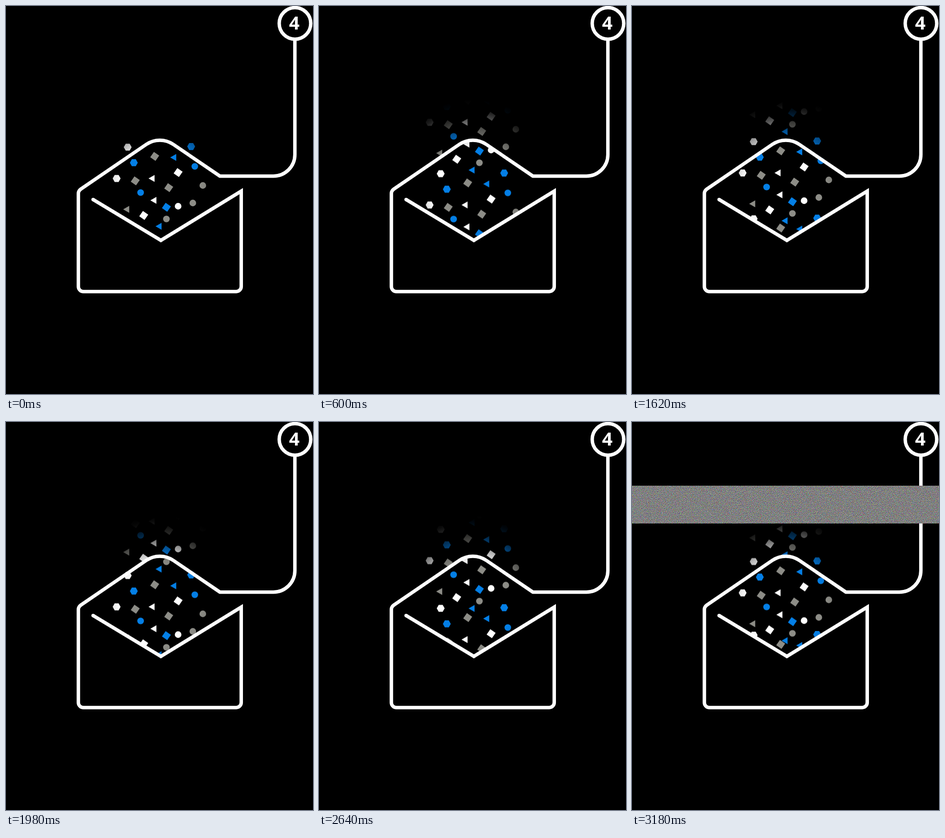
Write an HTML page without scripts that moves like this. It is 666x841 px and loops after 3.24 s.

```html
<!DOCTYPE html>
<html lang="en">
<head>
<meta charset="utf-8">
<title>Confetti envelope</title>
<style>
  html, body { margin: 0; width: 100%; height: 100%; overflow: hidden; background: #000; }
  svg { display: block; width: 100vw; height: 100vh; }
  .line { fill: none; stroke: #fff; stroke-width: 7.5; }
  .w { fill: #fff; }
  .b { fill: #047fe6; }
  .g { fill: #8d8d87; }
  .num { font: 800 40px "Noto Sans", "Open Sans", sans-serif; fill: #fff; text-anchor: middle; }

  /* the picture advances every 60 ms: 54 steps per loop */
  .fall { animation: fall 3240ms steps(54) -1ms infinite; }
  .one { --from: 0px; --to: 310.4px; }
  .two {
    --from: -186.5px; --to: 162.5px;
    animation: fall 3240ms steps(54) -1ms infinite, enter 3240ms step-end -1ms infinite;
  }
  .three { --from: -414.8px; --to: 4.2px; }
  .static { animation: flash 3240ms step-end -1ms infinite; }

  @keyframes fall {
    from { transform: translateY(var(--from)); }
    to { transform: translateY(var(--to)); }
  }
  @keyframes enter {
    0% { visibility: hidden; }
    1.85%, 100% { visibility: visible; }
  }
  @keyframes flash {
    0% { visibility: hidden; }
    98.14%, 100% { visibility: visible; }
  }
</style>
</head>
<body>
<svg viewBox="0 0 666 841" xmlns="http://www.w3.org/2000/svg">
  <defs>
    <path id="hex" d="M-8.6 0L-4.3 -7.6H4.3L8.6 0L4.3 7.6H-4.3Z"/>
    <rect id="sq" x="-7" y="-7" width="14" height="14" transform="rotate(35)"/>
    <path id="tri" d="M-6.8 0L6.3 -7.5V7.5Z"/>
    <circle id="dot" r="7.2"/>

    <g id="confetti">
      <use href="#hex" class="w" x="264" y="306"/>
      <use href="#hex" class="b" x="401.7" y="304.6"/>
      <use href="#hex" class="b" x="277.3" y="339.7"/>
      <use href="#hex" class="w" x="240" y="373.8"/>
      <use href="#sq" class="g" x="322.6" y="326"/>
      <use href="#sq" class="g" x="280.4" y="379"/>
      <use href="#sq" class="w" x="373.4" y="361"/>
      <use href="#sq" class="g" x="353" y="393.8"/>
      <use href="#sq" class="b" x="348" y="436.3"/>
      <use href="#sq" class="w" x="298.8" y="454"/>
      <use href="#tri" class="b" x="363" y="328.3"/>
      <use href="#tri" class="w" x="316" y="373.7"/>
      <use href="#tri" class="w" x="320" y="421.3"/>
      <use href="#tri" class="g" x="261" y="440.8"/>
      <use href="#tri" class="b" x="331.2" y="477.5"/>
      <use href="#dot" class="b" x="409.6" y="347.6"/>
      <use href="#dot" class="b" x="292" y="404.4"/>
      <use href="#dot" class="w" x="373.4" y="434"/>
      <use href="#dot" class="g" x="427" y="389"/>
      <use href="#dot" class="g" x="405.3" y="427"/>
      <use href="#dot" class="g" x="348" y="461.6"/>
    </g>

    <radialGradient id="glow" gradientUnits="userSpaceOnUse" cx="334" cy="399" r="196">
      <stop offset=".44" stop-color="#fff"/>
      <stop offset=".51" stop-color="#fff" stop-opacity=".93"/>
      <stop offset=".6" stop-color="#fff" stop-opacity=".76"/>
      <stop offset=".7" stop-color="#fff" stop-opacity=".53"/>
      <stop offset=".79" stop-color="#fff" stop-opacity=".31"/>
      <stop offset=".88" stop-color="#fff" stop-opacity=".12"/>
      <stop offset=".94" stop-color="#fff" stop-opacity=".04"/>
      <stop offset="1" stop-color="#fff" stop-opacity="0"/>
    </radialGradient>
    <mask id="fade" maskUnits="userSpaceOnUse" x="0" y="0" width="666" height="841">
      <rect width="666" height="841" fill="url(#glow)"/>
    </mask>
    <clipPath id="mouth">
      <path d="M157 150V400L336 508L510 401V150Z"/>
    </clipPath>
    <filter id="noise" x="0" y="0" width="1" height="1" color-interpolation-filters="sRGB">
      <feTurbulence type="fractalNoise" baseFrequency=".87" numOctaves="2" seed="4"/>
      <feColorMatrix values="1.1 0 0 0 -.05  0 1.1 0 0 -.05  0 0 1.1 0 -.05  0 0 0 0 1"/>
    </filter>
  </defs>

  <rect width="666" height="841"/>

  <g clip-path="url(#mouth)">
    <g mask="url(#fade)">
      <g class="fall one"><use href="#confetti"/></g>
      <g class="fall two"><use href="#confetti"/></g>
      <g class="fall three">
        <use href="#confetti"/>
        <use href="#confetti" y="-186.3"/>
      </g>
    </g>
  </g>

  <path class="line" d="M626.700 72V322A46.700 46.700 0 0 1 580 368.700H464L363 300A52 52 0 0 0 304.300 300L162.300 396.900Q157 400.700 157 406.500V608A11 11 0 0 0 168 619H499.500A11 11 0 0 0 510.300 608V401.200L336 508L189 419.500"/>
  <circle cx="189" cy="419.500" r="3.750" class="w"/>
  <circle class="line" cx="626.900" cy="37.700" r="34.200"/>
  <text class="num" x="625.500" y="51">4</text>

  <rect class="static" y="138" width="666" height="82" filter="url(#noise)"/>
</svg>
</body>
</html>
```
